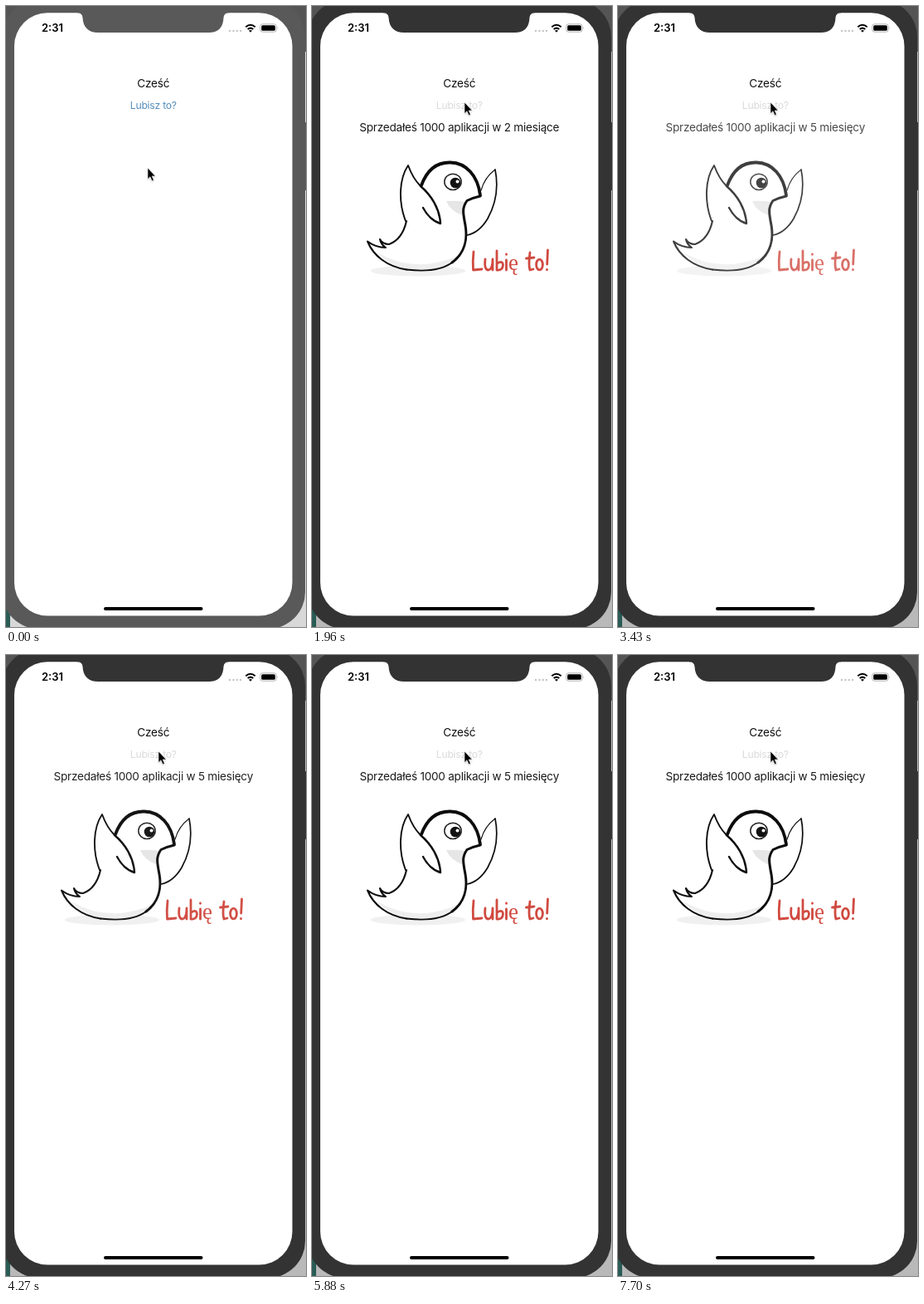
Recreate the animation shown at these times as an HTML page. Size 362 px wide and 748 px high, loop 8000 ms.

```html
<!DOCTYPE html>
<html lang="pl">
<head>
<meta charset="utf-8">
<title>Lubisz to?</title>
<style>
html, body { margin: 0; width: 100%; height: 100%; overflow: hidden; background: #fff; }
svg { display: block; width: 362px; height: 748px; }
text { font-family: Inter, "Noto Sans", sans-serif; font-size: 13.6px; letter-spacing: -.25px; text-anchor: middle; }
.line { fill: none; stroke: #0c0c0c; stroke-linecap: round; stroke-linejoin: round; }
.ink { fill: none; stroke: #d04a40; stroke-width: 2.8; stroke-linecap: round; stroke-linejoin: round; }
</style>
</head>
<body>
<svg viewBox="0 0 362 748">
  <!-- desktop behind the phone -->
  <rect id="desk" width="362" height="748"/>
  <rect width="362" height="55" fill="#555"/>
  <rect y="55" width="5" height="693" fill="#285c54"/>

  <!-- phone -->
  <g id="shell">
    <rect x="-5" y="-7" width="366" height="757" rx="44"/>
    <rect x="360" y="140" width="2" height="82"/>
  </g>
  <rect x="10" y="8.300" width="335.500" height="726.200" rx="40" fill="#fff"/>
  <path id="notch" d="M86 7V8.300Q92 8.300 92.500 14C93 26 100 32 111 32H245C256 32 262 26 262.500 14Q263 8.300 269 8.300V7Z"/>
  <rect x="118" y="724" width="119.500" height="4" rx="2"/>

  <!-- status bar -->
  <text x="56" y="31" style="font-size:13px;font-weight:600;letter-spacing:0">2:31</text>
  <g fill="#c4c4c4">
    <circle cx="270" cy="30" r="1.200"/><circle cx="274.500" cy="30" r="1.200"/>
    <circle cx="278.800" cy="30" r="1.200"/><circle cx="283" cy="30" r="1.200"/>
  </g>
  <g fill="none" stroke="#000" stroke-width="2">
    <path d="M289.300 25.300Q295 20.300 300.700 25.300M291.700 28Q295 25.200 298.300 28"/>
    <path d="M293 29.700Q295 28.200 297 29.700L295 31.800Z" fill="#000" stroke="none"/>
  </g>
  <rect x="306.800" y="21.800" width="19.400" height="9.400" rx="2.600" fill="none" stroke="#aaa" stroke-width=".9"/>
  <rect x="308.200" y="23.200" width="16.600" height="6.600" rx="1.500"/>
  <path d="M327.300 25V28.200Q328.600 26.600 327.300 25Z" fill="#aaa"/>

  <text x="177.800" y="97.500" fill="#111">Cześć</text>
  <text id="link" x="177.800" y="123.700" style="font-size:12.2px">Lubisz to?</text>

  <g id="content">
    <text x="177.800" y="151" fill="#1a1a1a">Sprzedałeś 1000 aplikacji w <tspan id="months"></tspan></text>

    <!-- bird -->
    <ellipse cx="128" cy="319" rx="57" ry="6.500" fill="#f0f0f0"/>
    <path d="M68 284C76 303 96 318 126 318.500C165 319 187 299 186 270C186 254 180 244 186 234L203 230C203 205 185 187 166 187.500C148 188 138 200 132 217L112 255C110 265 105 280 98 286Z" fill="#fff"/>
    <path d="M79 297Q125 324 178 300C165 315 147 319 124 318C104 317 89 308 79 297Z" fill="#eee"/>
    <path d="M162 235Q174 234 185 236C181 243 182 247 181 252Q167 247 162 235Z" fill="#e6e6e6"/>
    <path class="line" stroke-width="1.700" d="M221 197C225 217 222 238 212 256Q202 273 187 276"/>
    <path class="line" stroke-width="1.100" d="M204 222C207 211 213 203 221 197"/>
    <path class="line" stroke-width="1.900" d="M113 259C104 236 105 208 116 192C120 203 125 211 131 217"/>
    <path class="line" stroke-width="2.400" d="M131 217C144 228 154 244 155 262Q142 258 134 243"/>
    <path class="line" stroke-width="2.100" d="M114 259C111 272 104 283 93 287Q85 287 82 281Q83 287 89 291Q77 291 67 283.500C74 301 91 314 114 317.500"/>
    <path class="line" stroke-width="1.800" d="M114 317.500C136 320 157 318 169 309"/>
    <path class="line" stroke-width="3" d="M169 309C184 298 188 281 185 264C182 249 181 243 187 234.500Q194 231 203 229"/>
    <path class="line" stroke-width="3.800" d="M132 216C139 197 151 188 167 188.500C186 189 200 204 203 228"/>
    <ellipse cx="170" cy="211.800" rx="10.200" ry="9.600" fill="#fff" stroke="#222" stroke-width="1.500"/>
    <circle cx="173" cy="213" r="6.300" fill="#111"/>
    <circle cx="175.500" cy="211.500" r="2" fill="#fff"/>

    <!-- hand lettering -->
    <g role="img" aria-label="Lubię to!">
      <path class="ink" d="M195 296Q193.700 307 194.500 318L205 317"/>
      <path class="ink" d="M209 305Q207.500 318 213 318Q218 317 218 305V318"/>
      <path class="ink" d="M223 295V318Q230 319 230.500 312Q230 306 223.500 310"/>
      <path class="ink" d="M234.500 306V318M234.500 299V299.300"/>
      <text x="243" y="318" fill="#d04a40" style="font:27px 'Liberation Serif',serif;letter-spacing:0">ę</text>
      <path class="ink" d="M263 297Q261 312 263 318L267 317M258.500 304L268 303"/>
      <ellipse class="ink" cx="274.500" cy="311.500" rx="3.900" ry="6.400"/>
      <path class="ink" d="M284.500 294L283.700 311M283.500 317.500V317.800"/>
    </g>
  </g>

  <path id="cursor" d="M0 0V13.500L3 10.700L5.200 15.700L7.300 14.700L5.200 9.900H9.300Z" stroke="#fff" stroke-width=".6" style="filter:drop-shadow(0 1px 1px #0003)"/>
</svg>
<script>
const LOOP = 8000, STEP = 70, FADE = 1000;
const $ = id => document.getElementById(id);
const clamp = x => Math.max(0, Math.min(1, x));
const ease = p => p < .5 ? 2 * p * p : 1 - 2 * (1 - p) ** 2;

// each round: fade-in start, fade-out start and end
const ROUNDS = [[905, 2410, 2520], [2755, 4265, 4410], [4850, 6330, 6440], [6740, 9000, 9100]];
// time, x, y
const PATH = [[0, 171, 195], [630, 184, 110], [1330, 184, 110], [1540, 184, 116], [LOOP, 184, 116]];
// time, colour
const LINK = [[0, '#548dbb'], [910, '#dedede'], [1050, '#d2d2d2'], [1820, '#dadada'],
  [4690, '#e9e9e9'], [4830, '#dadada'], [6580, '#ebebeb'], [6860, '#dadada']];

function cursorAt(t) {
  const i = PATH.findIndex(k => k[0] > t);
  const [a, b] = [PATH[i - 1], PATH[i]];
  const p = ease((t - a[0]) / (b[0] - a[0]));
  return [1, 2].map(n => a[n] + (b[n] - a[n]) * p);
}

function opacityAt(t) {
  const round = ROUNDS.findLast(r => t >= r[0]);
  if (!round) return 0;
  const [start, hide, end] = round;
  return ease(clamp((t - start) / FADE)) * clamp((end - t) / (end - hide));
}

function draw(now) {
  const t = Math.floor(now % LOOP / STEP) * STEP;
  const active = t >= 630;
  const shell = active ? '#333' : '#595959';
  $('shell').setAttribute('fill', shell);
  $('notch').setAttribute('fill', shell);
  $('desk').setAttribute('fill', active ? '#b9b9b9' : '#d8d8d8');
  $('link').setAttribute('fill', LINK.findLast(k => t >= k[0])[1]);
  $('months').textContent = t < 2450 ? '2 miesiące' : '5 miesięcy';
  $('content').setAttribute('opacity', opacityAt(t));
  $('cursor').setAttribute('transform', `translate(${cursorAt(t)})`);
}

const begin = performance.now();
function tick() {
  draw(performance.now() - begin);
  requestAnimationFrame(tick);
}
tick();
</script>
</body>
</html>
```
